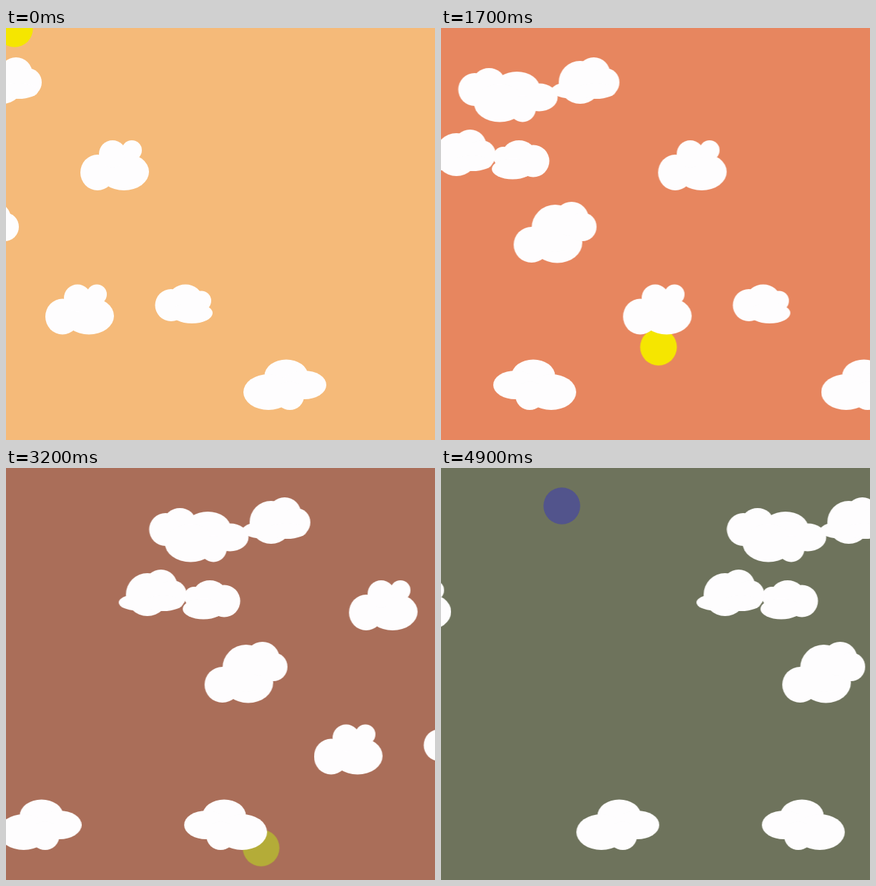
Animation of 600 by 576 pixels, one loop 5 s. Source, as an HTML page:

```html
<!DOCTYPE html>
<html lang="en">
<head>
<meta charset="utf-8">
<title>Day and night clouds</title>
<style>
  html, body { margin: 0; width: 100%; height: 100%; overflow: hidden; }
  svg { display: block; width: 600px; height: 576px; animation: sky 5s linear infinite; }
  .orb { animation: arc 5s linear infinite, glow 5s linear infinite; }
  .clouds { fill: #fefdfe; animation: drift 5s linear infinite; }

  @keyframes drift { to { transform: translateX(587px); } }

  @keyframes arc {
    0% { transform: translate(12px, 1px); }
    24% { transform: translate(209.5px, 272.5px); animation-timing-function: ease; }
    54%, 60% { transform: translate(374px, 574px); }
    74% { transform: translate(313.5px, 424px); }
    86% { transform: translate(262px, 271px); }
    98%, 100% { transform: translate(169px, 53px); }
  }

  @keyframes glow {
    0%, 60% { fill: #f5e600; }
    70%, 100% { fill: #52548c; }
  }

  @keyframes sky {
    0% { background: #f5ba79; }
    24% { background: #eb8558; }
    40%, 60% { background: #e58763; }
    74% { background: #162e3f; }
    86% { background: #2d4c4f; }
    96%, 100% { background: #6e735c; }
  }
</style>
</head>
<body>
<svg viewBox="0 0 600 576">
  <defs>
    <g id="puff">
      <ellipse cx="24" cy="45" rx="24" ry="25"/>
      <ellipse cx="61" cy="44" rx="35" ry="26"/>
      <circle cx="45" cy="19" r="19"/>
      <circle cx="72" cy="14" r="14"/>
    </g>
    <g id="bun">
      <circle cx="22" cy="29" r="22.5"/>
      <ellipse cx="42" cy="19" rx="23" ry="19"/>
      <circle cx="64" cy="23" r="14"/>
      <ellipse cx="51" cy="40" rx="29" ry="14.5"/>
    </g>
    <g id="wide">
      <ellipse cx="60" cy="22" rx="30.5" ry="22.5"/>
      <ellipse cx="35" cy="45" rx="35" ry="25"/>
      <ellipse cx="85" cy="35" rx="31" ry="20"/>
      <circle cx="65" cy="50" r="20"/>
    </g>
    <g id="tail">
      <ellipse cx="24" cy="46" rx="24" ry="11"/>
      <circle cx="40" cy="35" r="30"/>
      <circle cx="59" cy="23" r="23"/>
      <circle cx="75" cy="35" r="20"/>
      <ellipse cx="62" cy="47" rx="28" ry="11"/>
    </g>
    <g id="long">
      <circle cx="23" cy="30" r="23"/>
      <ellipse cx="43" cy="19" rx="22" ry="19"/>
      <ellipse cx="82" cy="28" rx="32" ry="23"/>
      <ellipse cx="113" cy="41" rx="26" ry="19.5"/>
      <ellipse cx="58" cy="49" rx="36" ry="26.5"/>
      <circle cx="90" cy="57" r="18.5"/>
    </g>
    <g id="slope">
      <circle cx="25" cy="60" r="25"/>
      <ellipse cx="61" cy="57" rx="35" ry="28.5"/>
      <circle cx="58" cy="37" r="33"/>
      <circle cx="81" cy="24" r="24"/>
      <circle cx="96" cy="35" r="20"/>
    </g>
  </defs>

  <circle class="orb" r="25.7"/>

  <g class="clouds">
    <use href="#puff" x="104" y="157"/>
    <use href="#puff" x="-657" y="157"/>
    <use href="#puff" x="55" y="358.5"/>
    <use href="#bun" x="209" y="358.5"/>
    <use href="#bun" transform="translate(-48.5 157) scale(-1 1)"/>
    <use href="#wide" x="332" y="464"/>
    <use href="#wide" x="-386" y="464"/>
    <use href="#wide" transform="translate(-10.5 464) scale(-1 1)"/>
    <use href="#tail" x="-218" y="142"/>
    <use href="#tail" x="-45" y="41"/>
    <use href="#long" x="-175.5" y="56"/>
    <use href="#slope" x="-98" y="243"/>
  </g>
</svg>
<script>
// Play the keyframes at ten pictures per second
const LOOP = 5000, STEP = 100;
const parts = document.getAnimations();
parts.forEach(part => part.pause());

const start = performance.now();
function tick() {
  const t = (performance.now() - start) % LOOP;
  const shown = Math.floor(t / STEP) * STEP;
  parts.forEach(part => { part.currentTime = shown; });
  requestAnimationFrame(tick);
}
tick();
</script>
</body>
</html>
```
